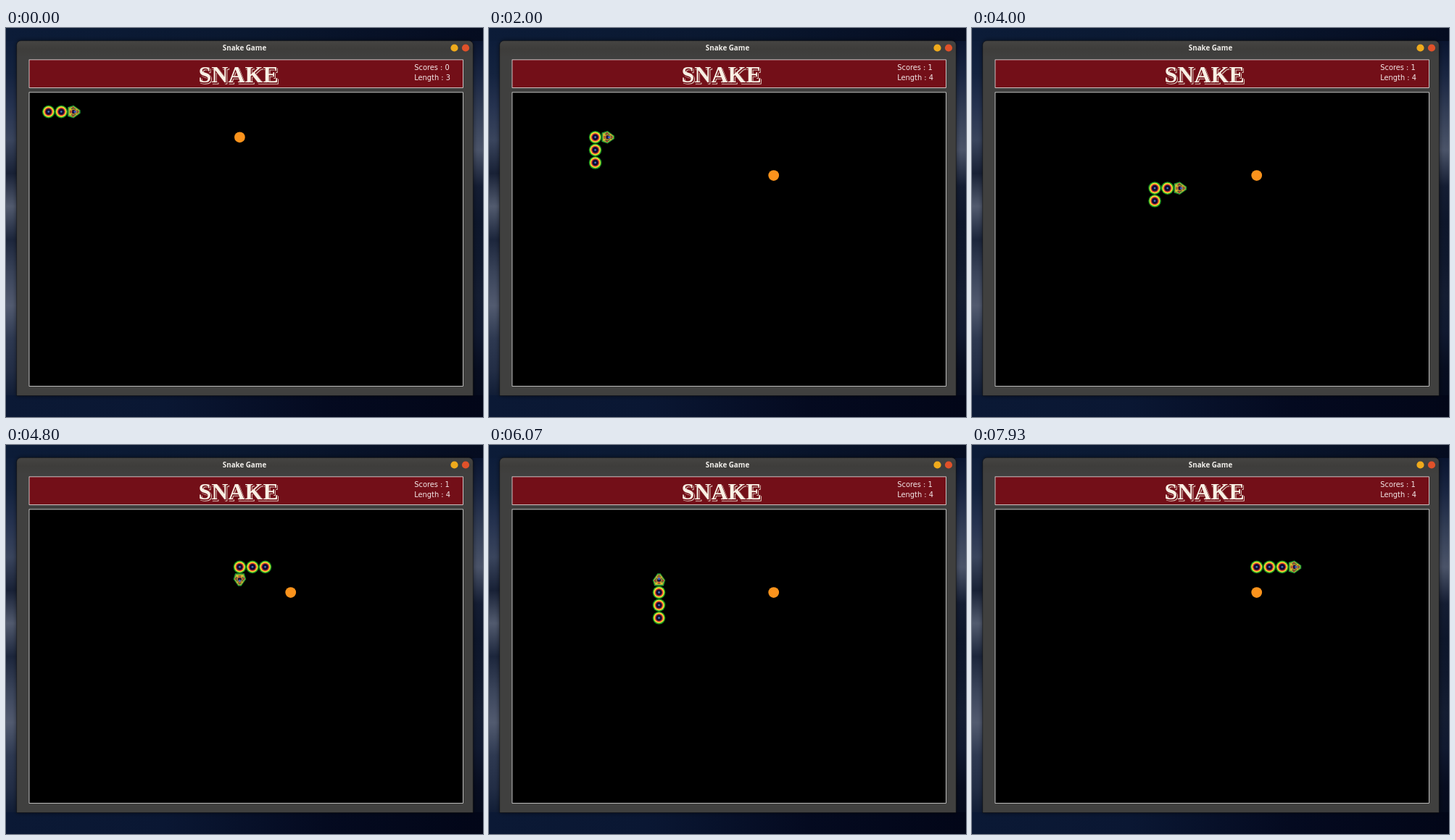
Animation, 658 px wide and 537 px high, one loop 8 s. Source, as an HTML page with a canvas:

```html
<!DOCTYPE html>
<html lang="en">
<head>
<meta charset="utf-8">
<title>Snake Game</title>
<style>
  html, body { margin: 0; width: 100%; height: 100%; overflow: hidden; background: #071022; }
  canvas { display: block; }
</style>
</head>
<body>
<canvas id="stage" width="658" height="537"></canvas>
<script>
const W = 658, H = 537, LOOP = 8000, TICKS = 120;
const ctx = document.getElementById('stage').getContext('2d');

// The game draws in its own units: 25 per cell, scaled onto the screen
const SCALE = .7032, LEFT = 14.75, TOP = 36.5, CELL = 25;
const DIRS = { R: [1, 0], D: [0, 1], L: [-1, 0], U: [0, -1] };
const ROUTE = 'R13 D8 L10 U6 R16 D9 L10 U5 R9 U3 L5 D7 R4 U2 L9 U7 R10 D6 L6 U4 R8';
const FOODS = [[15, 2], [19, 5]];

// Steady running between a few [tick, moves] keys, with some ticks held
const KEYS = [[2, 0], [14, 18], [30, 38], [51, 66], [72, 95], [119, 157]];
const HELD = [9, 15, 38, 39, 52, 99, 112];

function buildTrack() {
  const track = [[0, 0], [1, 0], [2, 0]];
  for (const leg of ROUTE.split(' ')) {
    const [dx, dy] = DIRS[leg[0]];
    for (let n = +leg.slice(1); n > 0; n--) {
      const [x, y] = track[track.length - 1];
      track.push([x + dx, y + dy]);
    }
  }
  return track;
}
const track = buildTrack();
const meal = track.findIndex(([x, y]) => x === FOODS[0][0] && y === FOODS[0][1]);

function movesAt(tick) {
  while (HELD.includes(tick)) tick--;
  const i = Math.max(1, KEYS.findIndex(k => k[0] >= tick));
  const [t0, m0] = KEYS[i - 1], [t1, m1] = KEYS[i];
  return Math.max(0, Math.floor(m0 + (m1 - m0) * (tick - t0) / (t1 - t0) + .9));
}

const center = ([col, row]) => [62.5 + col * CELL, 112.5 + row * CELL];

function disc(c, x, y, r, fill) {
  c.fillStyle = fill;
  c.beginPath();
  c.arc(x, y, r, 0, Math.PI * 2);
  c.fill();
}

function text(c, str, x, y, font, fill, align = 'left') {
  c.font = font;
  c.textAlign = align;
  c.fillStyle = fill;
  c.fillText(str, x, y);
}

function toGame(c) {
  c.setTransform(SCALE, 0, 0, SCALE, LEFT, TOP);
}

// Evenly spaced colour stops
function blend(c, x0, y0, x1, y1, colors) {
  const g = c.createLinearGradient(x0, y0, x1, y1);
  colors.forEach((col, i) => g.addColorStop(i / (colors.length - 1), col));
  return g;
}

function drawDesktop(c) {
  c.fillStyle = blend(c, 0, 0, W, 0, ['#0c1c38', '#0a1830', '#050c20']);
  c.fillRect(0, 0, W, H);
  c.fillStyle = blend(c, 0, 18, 0, 520, ['#0d1d3a', '#14233f', '#263350', '#3a455d', '#182136',
    '#525b6f', '#1c263c', '#3a445a', '#525b70', '#2e3951', '#222d45', '#0a1730']);
  c.fillRect(0, 18, 16, 502);
  c.fillStyle = blend(c, 0, 18, 0, 520, ['#0a1530', '#1b2743', '#343f57', '#4b5469', '#141d33',
    '#0d162b', '#0f182d', '#141d32', '#101930', '#070d20', '#040a1c']);
  c.fillRect(643, 18, 15, 502);
  c.fillStyle = blend(c, 0, 0, W, 0, ['#0b1935', '#0a1733', '#040a20', '#020618']);
  c.fillRect(0, 507, W, 30);
}

function drawFrame(c) {
  c.beginPath();
  c.roundRect(14.7, 17.6, 629.6, 490, [6, 6, 0, 0]);
  c.save();
  c.shadowColor = 'rgba(0,0,0,.6)';
  c.shadowBlur = 6;
  c.fillStyle = blend(c, 0, 18, 0, 40, ['#454442', '#3e3d3b', '#40403f']);
  c.fill();
  c.restore();
  c.strokeStyle = 'rgba(0,0,0,.4)';
  c.lineWidth = 1;
  c.stroke();
  text(c, 'Snake Game', 329, 31, 'bold 9.8px "Open Sans", sans-serif', '#f0eeea', 'center');
  disc(c, 618.5, 27.5, 5.1, '#efaa1c');
  disc(c, 634, 27.5, 5.1, '#e0512a');
}

function panel(c, y, h, fill) {
  c.fillStyle = fill;
  c.fillRect(24.5, y, 851, h);
  c.strokeStyle = '#fff';
  c.lineWidth = 1;
  c.strokeRect(24.5, y, 851, h);
}

function drawTitle(c) {
  c.font = 'bold 45.5px "Liberation Serif", serif';
  c.textAlign = 'center';
  c.lineJoin = 'round';
  c.lineWidth = 2;
  ['#d9c3b8', '#730f18'].forEach((col, i) => {
    c.strokeStyle = col;
    c.strokeText('SNAKE', 437 - i * 1.4, 57 - i * 1.4);
  });
  c.fillStyle = '#f8f0e4';
  c.fillText('SNAKE', 435, 55.4);
}

function makeBackdrop() {
  const layer = document.createElement('canvas');
  layer.width = W;
  layer.height = H;
  const c = layer.getContext('2d');
  drawDesktop(c);
  drawFrame(c);
  toGame(c);
  panel(c, 10.5, 55, '#730f18');
  panel(c, 74.5, 577, '#000');
  drawTitle(c);
  return layer;
}
const backdrop = makeBackdrop();

const RINGS = ['#1f9c22', '#f3e436', '#ea4a2c', '#1a0d3a', '#0b0a2c', '#3f70bc'];

function drawLink(cell) {
  const [x, y] = center(cell);
  RINGS.forEach((col, i) => disc(ctx, x, y, 12.5 - i * 2.1, col));
}

const SCALES = ['#249a35', '#b9b834', '#2b6038', '#c98a2e', '#17133f'];

// Nested wedges with mirrored spots; faces right before turning
function drawHead(cell, angle) {
  ctx.save();
  ctx.translate(...center(cell));
  ctx.rotate(angle);
  SCALES.forEach((col, i) => {
    const k = 1 - i * .17;
    ctx.fillStyle = col;
    ctx.beginPath();
    for (const [x, y] of [[-12.3, -9], [-1, -12.5], [12.5, -3], [12.5, 3], [-1, 12.5], [-12.3, 9]]) {
      ctx.lineTo(x * k, y * k);
    }
    ctx.fill();
  });
  for (const s of [-1, 1]) {
    disc(ctx, -7, s * 4.5, 2.2, '#e0b82e');
    disc(ctx, -2, s * 8, 1.7, '#b8352f');
    disc(ctx, 5, s * 4.5, 1.8, '#d9a02c');
  }
  disc(ctx, -6, 0, 2, '#d2512c');
  disc(ctx, 2, 0, 2.3, '#3f62c8');
  disc(ctx, 8, 0, 1.6, '#c33a36');
  ctx.restore();
}

function drawScore(eaten) {
  const font = '14px "DejaVu Sans", sans-serif';
  text(ctx, 'Scores : ' + eaten, 780, 30, font, '#f4e8e8');
  text(ctx, 'Length : ' + (3 + eaten), 780, 50, font, '#f4e8e8');
}

function render(tick) {
  const head = movesAt(tick) + 2, eaten = head >= meal ? 1 : 0;
  ctx.setTransform(1, 0, 0, 1, 0, 0);
  ctx.drawImage(backdrop, 0, 0);
  toGame(ctx);
  drawScore(eaten);
  disc(ctx, ...center(FOODS[eaten]), 10.5, '#fb931c');
  for (let i = head - 2 - eaten; i < head; i++) drawLink(track[i]);
  const [ax, ay] = track[head - 1], [bx, by] = track[head];
  drawHead(track[head], Math.atan2(by - ay, bx - ax));
}

const start = performance.now();
let shown = -1;
function loop() {
  const t = (performance.now() - start) % LOOP;
  const tick = Math.min(TICKS - 1, Math.floor((t + 4) / LOOP * TICKS));
  if (tick !== shown) render(shown = tick);
  requestAnimationFrame(loop);
}
loop();
</script>
</body>
</html>
```
